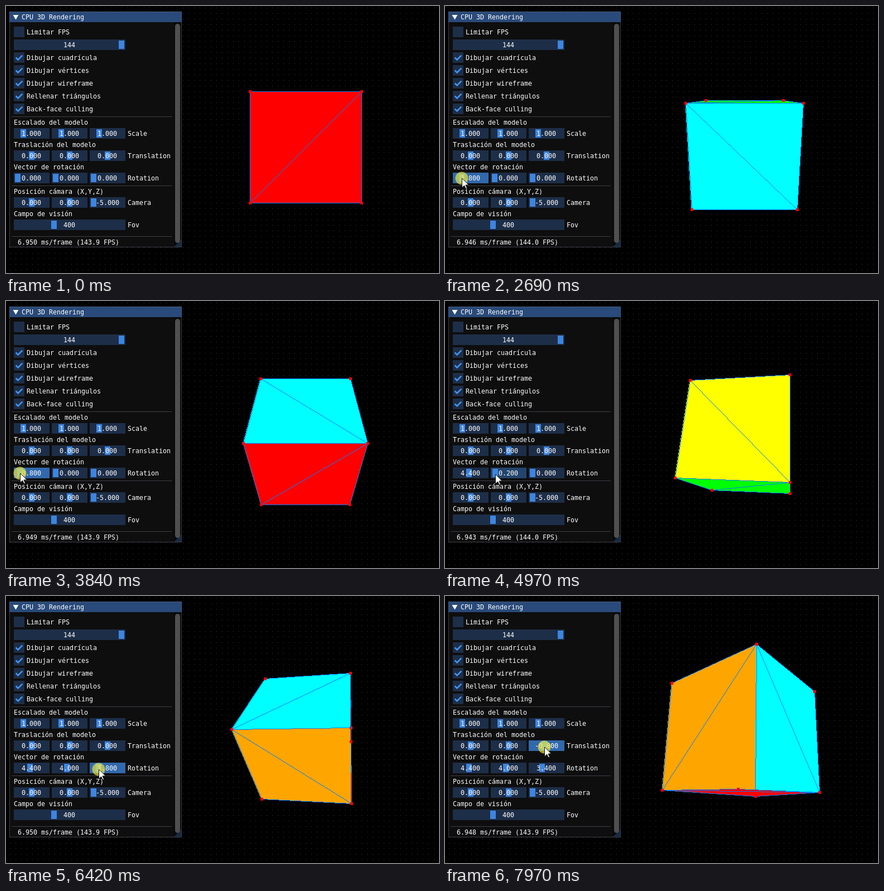
Write an HTML page with a canvas that moves like this. It is 776 px wide and 479 px high and loops after 8000 ms.

```html
<!DOCTYPE html>
<html lang="es">
<head>
<meta charset="utf-8">
<title>CPU 3D Rendering</title>
<style>
html, body { margin: 0; width: 100%; height: 100%; overflow: hidden; background: #000; }
canvas { display: block; }
</style>
</head>
<body>
<canvas id="stage" width="776" height="479"></canvas>
<script>
const ctx = document.getElementById('stage').getContext('2d');
const LOOP = 8000, STEP = 81.4, LAST = 98;
const CX = 537, CY = 253, FOV = 400, CAMERA = 5;

// The bits of a corner's index give the signs of x, y (down) and z.
const CORNERS = Array.from({ length: 8 }, (_, i) => [1, 2, 4].map(bit => i & bit ? 1 : -1));
// Four corners per face, split along the first-third diagonal.
const FACES = { yellow: '7623', lime: '7546', orange: '4026', cyan: '4510', blue: '3157', red: '2013' };

// Pointer stops: step, x, y
const STOPS = [[13, 0, 262], [26, 22, 309], [42, 42, 309], [50, 18, 309], [59, 43, 309],
  [61, 90, 311], [68, 109, 311], [70, 113, 311], [74, 157, 311], [82, 174, 311],
  [89, 182, 271], [91, 182, 271], [94.5, 171, 271], [LAST, 178, 271]];
const ROTATE_DRAGS = [[26, 59], [61, 68], [74, 82]], MOVE_DRAG = [90, LAST];

function box(x, y, w, h, color) {
  ctx.fillStyle = color;
  ctx.fillRect(x, y, w, h);
}

function poly(points, color) {
  ctx.beginPath();
  points.forEach(p => ctx.lineTo(...p));
  ctx.closePath();
  ctx.fillStyle = color;
  ctx.fill();
}

function text(str, x, midY) {
  ctx.fillStyle = '#fff';
  ctx.fillText(str, x, midY + 4);
}

function pointer(step) {
  const i = Math.max(1, STOPS.findIndex(s => s[0] >= step));
  const a = STOPS[i - 1], b = STOPS[i];
  const ease = (1 - Math.cos(Math.PI * (step - a[0]) / (b[0] - a[0]))) / 2;
  return [1, 2].map(n => Math.round(a[n] + (b[n] - a[n]) * ease));
}

// Slider value set by a drag: five pixels per unit from the zero position.
function dragged(step, [from, to], zeroX, min) {
  if (step < from) return 0;
  return Math.max(min, (pointer(Math.min(step, to))[0] - zeroX) / 5);
}

function line(a, b) {
  const dx = b[0] - a[0], dy = b[1] - a[1];
  const n = Math.max(Math.abs(dx), Math.abs(dy)) || 1;
  for (let i = 0; i <= n; i++)
    box(Math.round(a[0] + dx * i / n), Math.round(a[1] + dy * i / n), 1, 1, '#0080ff');
}

function edgeX(p, q, y) {
  return p[1] === q[1] ? q[0] : p[0] + (q[0] - p[0]) * (y - p[1]) / (q[1] - p[1]);
}

function triangle(points, color) {
  const [a, b, c] = [...points].sort((p, q) => p[1] - q[1]);
  for (let y = a[1]; y <= c[1]; y++) {
    const u = edgeX(a, c, y), v = y <= b[1] ? edgeX(a, b, y) : edgeX(b, c, y);
    const left = Math.floor(Math.min(u, v));
    box(left, y, Math.floor(Math.max(u, v)) - left + 1, 1, color);
  }
  points.forEach((p, i) => line(p, points[(i + 1) % 3]));
  points.forEach(p => box(p[0] - 2, p[1] - 2, 5, 5, 'red'));
}

function spin(a, b, angle) {
  const c = Math.cos(angle), s = Math.sin(angle);
  return [a * c - b * s, a * s + b * c];
}

function cube([rx, ry, rz], tz) {
  const turned = CORNERS.map(([x, y, z]) => {
    [y, z] = spin(y, z, rx);
    [z, x] = spin(z, x, ry);
    [x, y] = spin(x, y, rz);
    return [x, y, z];
  });
  const flat = turned.map(([x, y, z]) => {
    const k = FOV / (z + tz + CAMERA);
    return [Math.floor(CX + x * k), Math.floor(CY + y * k)];
  });
  for (const [color, ids] of Object.entries(FACES)) {
    const normalZ = [...ids].reduce((sum, i) => sum + turned[i][2], 0) / 4;
    if (-CAMERA * normalZ <= 1) continue;
    const [a, b, c, d] = [...ids].map(i => flat[i]);
    triangle([a, b, c], color);
    triangle([a, c, d], color);
  }
}

function slider(x, midY, w, label, fraction, [mx, my, down]) {
  const y = midY - 10;
  const over = mx >= x && mx < x + w && my >= y && my < y + 19;
  box(x, y, w, 19, !over ? '#1d2e48' : down ? '#3169ac' : '#23456c');
  box(Math.round(x + 2 + (w - 14) * fraction), y + 2, 10, 15, over && down ? '#4296fa' : '#3d85e0');
  text(label, Math.floor(x + w / 2 - label.length * 3.5), midY);
}

function vector(midY, title, name, values, min, max, mouse) {
  text(title, 14, midY - 20);
  values.forEach((v, i) =>
    slider(14 + 68 * i, midY, 64, v.toFixed(3), (v - min) / (max - min), mouse));
  text(name, 218, midY);
}

function checkbox(midY, label, checked) {
  box(14, midY - 10, 19, 19, '#1d2e48');
  if (checked) {
    ctx.beginPath();
    ctx.moveTo(17.65, midY - 0.5);
    ctx.lineTo(21.55, midY + 3.4);
    ctx.lineTo(29.35, midY - 4.4);
    ctx.strokeStyle = '#4296fa';
    ctx.lineWidth = 2.6;
    ctx.stroke();
  }
  text(label, 37, midY);
}

function panel(step, rotation, tz, mouse) {
  box(6, 10, 309, 423, '#0e0e0e');
  box(6, 10, 309, 19, '#294a7a');
  poly([[12.5, 16], [22.5, 16], [17.5, 24.5]], '#fff');
  text('CPU 3D Rendering', 28, 20);

  box(301, 29, 13, 403, '#090909');
  poly([[314, 419], [314, 432], [301, 432]], '#182a42');
  ctx.beginPath();
  ctx.roundRect(303, 32, 9, 393, 4.5);
  ctx.fillStyle = '#4f4f4f';
  ctx.fill();
  ctx.strokeStyle = 'rgba(110,110,128,.5)';
  ctx.lineWidth = 1;
  ctx.strokeRect(6.5, 10.5, 308, 422);

  checkbox(47, 'Limitar FPS', false);
  slider(14, 70, 200, '144', 1, mouse);
  ['Dibujar cuadrícula', 'Dibujar vértices', 'Dibujar wireframe', 'Rellenar triángulos',
   'Back-face culling'].forEach((label, i) => checkbox(93 + 23 * i, label, true));
  [198, 322, 413].forEach(y => box(10, y, 287, 1, '#3e3e47'));

  vector(229, 'Escalado del modelo', 'Scale', [1, 1, 1], 0, 5, mouse);
  vector(269, 'Traslación del modelo', 'Translation', [0, 0, tz], -5, 5, mouse);
  vector(309, 'Vector de rotación', 'Rotation', rotation, 0, 10, mouse);
  vector(353, 'Posición cámara (X,Y,Z)', 'Camera', [0, 0, -CAMERA], -5, 5, mouse);
  text('Campo de visión', 14, 373);
  slider(14, 393, 200, String(FOV), 0.35, mouse);
  text('Fov', 218, 393);

  const ms = 6.9465 + 0.0035 * Math.cos(2.4235 * step);
  text(`${ms.toFixed(3)} ms/frame (${(1000 / ms).toFixed(1)} FPS)`, 21, 424);
}

function cursor([x, y, down]) {
  if (down) {
    ctx.beginPath();
    ctx.arc(x, y, 11.5, 0, 7);
    ctx.fillStyle = 'rgba(240,232,55,.67)';
    ctx.fill();
  }
  const arrow = [[0, 0], [0, 17], [4, 13], [7, 19], [9, 18], [6.5, 12], [12, 12]];
  poly(arrow.map(p => [p[0] + x + 0.5, p[1] + y]), '#fff');
  ctx.strokeStyle = '#111';
  ctx.lineWidth = 1;
  ctx.stroke();
}

function draw(time) {
  const step = Math.min(LAST, Math.floor((time % LOOP + 8) / STEP));
  const down = [...ROTATE_DRAGS, MOVE_DRAG].some(([from, to]) => step >= from && step < to + 1 && step !== 61 && step !== 59);
  const mouse = step < STOPS[0][0] ? [-99, -99, false] : [...pointer(step), down];
  const rotation = ROTATE_DRAGS.map((drag, i) => dragged(step, drag, 21 + 68 * i, 0));
  const tz = dragged(step, MOVE_DRAG, 182, -5);

  ctx.font = '11.63px "DejaVu Sans Mono", monospace';
  box(0, 0, 776, 479, '#000');
  for (let y = 3; y < 479; y += 10)
    for (let x = 7; x < 776; x += 10) box(x, y, 1, 1, '#404040');
  cube(rotation, tz);
  panel(step, rotation, tz, mouse);
  cursor(mouse);
}

const start = performance.now();
function tick() {
  draw(performance.now() - start);
  requestAnimationFrame(tick);
}
tick();
</script>
</body>
</html>
```
